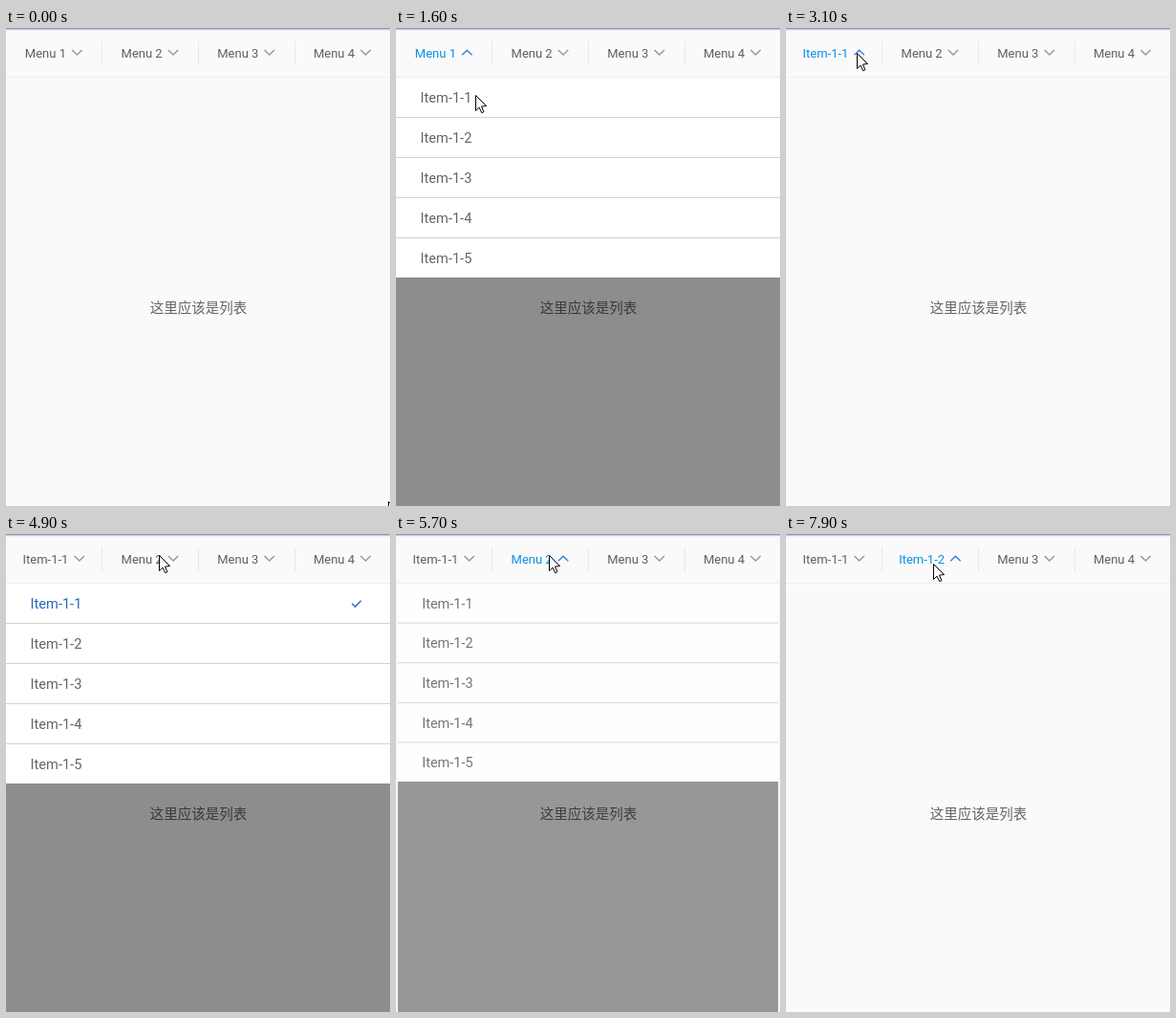
Write an HTML page with a canvas that moves like this. It is 402 px wide and 500 px high and loops after 8000 ms.

```html
<!DOCTYPE html>
<html lang="zh-CN">
<head>
<meta charset="utf-8">
<title>Dropdown menu</title>
<style>
html, body { margin: 0; width: 100%; height: 100%; overflow: hidden; background: #fafafa; }
canvas { display: block; }
</style>
</head>
<body>
<canvas id="stage" width="402" height="500"></canvas>
<script>
const ctx = document.getElementById('stage').getContext('2d');
const W = 402, H = 500, LOOP = 8000, STEP = 100;
const BAR = 52, ROW = 41, PITCH = 42, ROWS = 5;
const LIST_H = ROWS * PITCH - 1;
const GREY = '#5e5e5e', SOFT = '#646464', BLUE = '#0a8fe8', PICKED = '#2468bd';
const OPEN = 250, CLOSE = 150;

// Panel fades: start, duration, final opacity
const FADES = [
  [920, OPEN, 1], [2204, CLOSE, 0],
  [3600, 0, 1], [4904, CLOSE, 0],
  [5500, OPEN, 1], [7000, 0, 0]
];

// Pointer moves: start, end, x, y
const MOVES = [
  [0, 700, 76, 23],
  [1300, 1600, 83, 70],
  [2300, 2800, 74, 26],
  [4200, 4500, 160, 22],
  [5800, 6400, 138, 113],
  [7100, 7600, 154, 31]
];

const within = (t, a, b) => t >= a && t < b;
const ease = p => 0.5 - 0.5 * Math.cos(Math.PI * Math.min(1, p));
const progress = (t, start, span) => span ? ease((t - start) / span) : 1;

function rect(x, y, w, h, color) {
  ctx.fillStyle = color;
  ctx.fillRect(x, y, w, h);
}

function line(points, color, width) {
  ctx.beginPath();
  points.forEach(([x, y]) => ctx.lineTo(x, y));
  ctx.strokeStyle = color;
  ctx.lineWidth = width;
  ctx.stroke();
}

function label(text, x, y, color, size) {
  ctx.font = size + 'px Roboto, sans-serif';
  ctx.fillStyle = color;
  ctx.fillText(text, x, y);
}

function panelOpacity(t) {
  let value = 0;
  for (const [start, span, to] of FADES) {
    if (t >= start) value += (to - value) * progress(t, start, span);
  }
  return value;
}

function pointerAt(t) {
  let x = 400, y = 495;
  for (const [a, b, tx, ty] of MOVES) {
    if (t <= a) break;
    const p = progress(t, a, b - a);
    x += (tx - x) * p;
    y += (ty - y) * p;
  }
  return [Math.round(x), Math.round(y)];
}

function drawPage() {
  rect(0, 0, W, H, '#fafafa');
  ctx.font = '14.5px "Noto Sans CJK SC", "Noto Sans CJK", sans-serif';
  ctx.textAlign = 'center';
  ctx.fillStyle = '#646464';
  ctx.fillText('这里应该是列表', 201.5, 297.6);
  ctx.textAlign = 'left';
}

function drawPanel(opacity, picked) {
  if (opacity < 0.001) return;
  const scale = 0.9 + 0.1 * opacity;
  ctx.save();
  ctx.globalAlpha = opacity;
  ctx.translate(W / 2, BAR);
  ctx.scale(scale, scale);
  ctx.translate(-W / 2, 0);
  rect(0, LIST_H, W, 600, 'rgba(0,0,0,0.44)');
  rect(0, 0, W, LIST_H, '#fff');
  for (let i = 0; i < ROWS; i++) {
    const y = i * PITCH;
    const on = i === picked;
    if (i < ROWS - 1) rect(0, y + ROW, W, 1, '#d2d2d2');
    label('Item-1-' + (i + 1), 25.6, y + 26, on ? PICKED : SOFT, 14.6);
    if (on) line([[362.3, y + 20.8], [365.5, y + 24], [371.7, y + 17.8]], '#2f74c8', 1.6);
  }
  ctx.restore();
}

function drawTab(text, i, active) {
  const size = 13, mid = 50.1 + i * 100.7;
  ctx.font = size + 'px Roboto, sans-serif';
  const full = ctx.measureText(text).width + 17.4;
  const left = mid - full / 2;
  label(text, left, 31, active ? BLUE : GREY, size);
  const cx = left + full - 6;
  const [tip, ends] = active ? [23.2, 28.2] : [28, 23];
  line([[cx - 5.2, ends], [cx, tip], [cx + 5.2, ends]], active ? '#3a82e0' : '#999', 1.5);
}

function drawBar(t) {
  rect(0, 0, W, BAR, '#fafafa');
  ['#9292bb', '#cacad7', '#efeff1'].forEach((c, y) => rect(0, y, W, 1, c));
  rect(0, BAR - 1, W, 1, '#eee');
  for (let i = 1; i < 4; i++) rect(i * 101 - 1, 14, 1, 25, '#e8e8e8');
  const first = within(t, 900, 2300) || within(t, 3100, 4900);
  const second = within(t, 5400, 7000) || t >= 7900;
  drawTab(t < 2300 ? 'Menu 1' : 'Item-1-1', 0, first);
  drawTab(t < 7000 ? 'Menu 2' : 'Item-1-2', 1, second);
  drawTab('Menu 3', 2, false);
  drawTab('Menu 4', 3, false);
}

function drawPointer([x, y]) {
  ctx.save();
  ctx.translate(x + 0.5, y + 0.5);
  ctx.beginPath();
  [[0, 0], [0, 16], [3.6, 12.6], [6.2, 18.2], [8.4, 17.2], [6, 11.6], [11, 11]]
    .forEach(([px, py]) => ctx.lineTo(px, py));
  ctx.closePath();
  ctx.fillStyle = '#fff';
  ctx.fill();
  ctx.strokeStyle = '#000';
  ctx.lineWidth = 1;
  ctx.stroke();
  ctx.restore();
}

function draw(t) {
  drawPage();
  drawPanel(panelOpacity(t), within(t, 3600, 5100) ? 0 : -1);
  drawBar(t);
  drawPointer(pointerAt(t));
}

const begin = performance.now();
function tick() {
  const t = Math.max(0, performance.now() - begin) % LOOP;
  draw(Math.floor(t / STEP) * STEP);
  requestAnimationFrame(tick);
}
tick();
</script>
</body>
</html>
```
